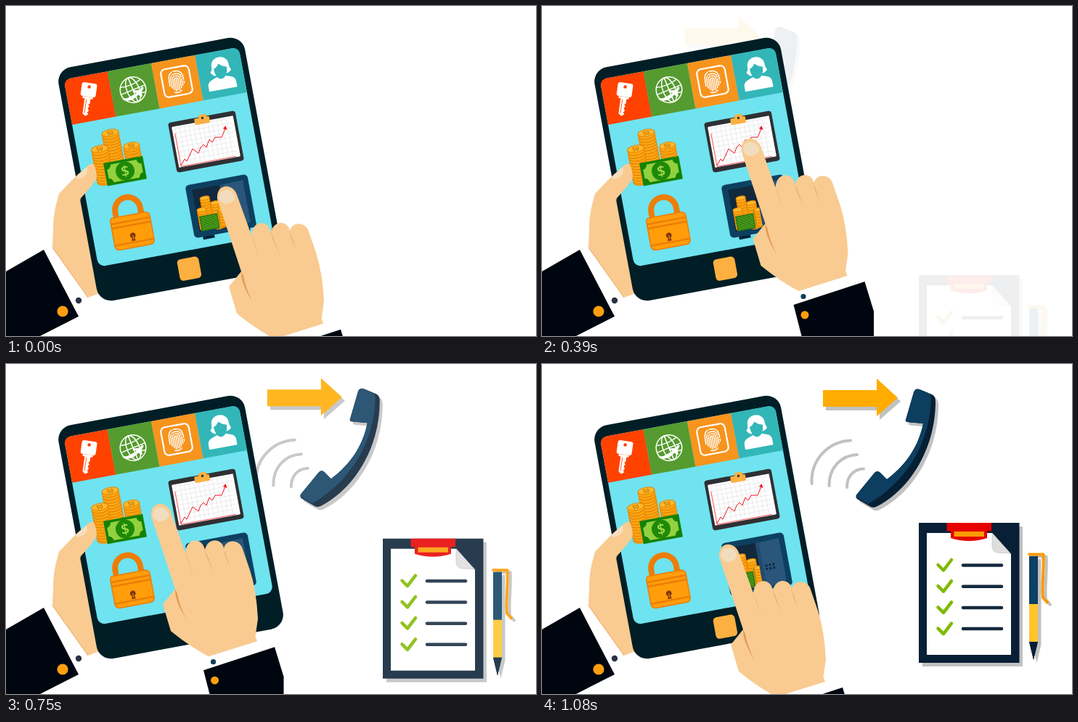
Animation of 730 by 455 pixels, one loop 1.85 s. Source, as an HTML page:

```html
<!DOCTYPE html>
<html lang="en">
<head>
<meta charset="utf-8">
<title>Mobile banking</title>
<style>
  html, body { margin: 0; width: 100%; height: 100%; overflow: hidden; background: #fff; }
  svg { display: block; width: 730px; height: 455px; }
  text { font-family: "Open Sans", Arial, sans-serif; text-anchor: middle; }
</style>
</head>
<body>
<svg viewBox="0 0 730 455">
  <defs>
    <path id="arrow" d="M387 36H461V20L490 46.500L461 72V59H387Z"/>
    <path id="handset" d="M501 77L512 39Q514 33 520 35L537 42Q542 44 542 52C542 115 508 173 460 197Q455 199 451 196L434 186Q431 183 434 180L458 150Q462 146 466 150L475 159C503 138 519 112 525 82L503 80Q500 79 501 77Z"/>
    <path id="pen" d="M671 265H683V383L677 408L671 383Z"/>
    <path id="penClip" d="M669.500 262.500H690.500C692 282 688 305 690 322L697 330" fill="none" stroke-width="4" stroke-linejoin="round"/>
    <path id="tick" d="M545.500 277L553 284.500L564 270" fill="none" stroke="#7fba00" stroke-width="4.500" stroke-linecap="round" stroke-linejoin="round"/>
    <path id="line" d="M580 277.500H633" stroke="#14293e" stroke-width="4.500" stroke-linecap="round"/>
    <pattern id="grid" width="6.500" height="6.500" patternUnits="userSpaceOnUse">
      <path d="M0 .5H6.500M.5 0V6.500" stroke="#e2e2e6" stroke-width=".7"/>
    </pattern>
    <pattern id="hatch" width="3" height="3" patternUnits="userSpaceOnUse" patternTransform="rotate(35)">
      <rect width="3" height="3" fill="#1c7d0d"/><path d="M0 1H3" stroke="#86b32a"/>
    </pattern>
  </defs>

  <g id="phone">
    <use href="#arrow" x="4" y="5" fill="#c1c1c1"/>
    <use href="#arrow" fill="#ffab00"/>
    <g fill="none" stroke="#c1c1c1" stroke-width="4" stroke-linecap="round">
      <path d="M371.500 165C370 132 394 107 425 105.500"/>
      <path d="M395.500 168C395 144 411 126 434 125"/>
      <path d="M420 170C420 154 430 145 443 144.500"/>
    </g>
    <use href="#handset" x="4" y="4.500" fill="#c1c1c1"/>
    <use href="#handset" fill="#071f33"/>
    <path fill="#0d3e60" d="M501 77L512 39Q514 33 520 35L532 40Q536 42 536 49C534 108 503 162 449 193L434 184Q431 182 434 179L458 150Q462 146 466 150L475 159C503 138 519 112 525 82L503 80Q500 79 501 77Z"/>
  </g>

  <g id="checklist">
    <path fill="#c1c1c1" d="M524 224H662V417H524Z"/>
    <path fill="#091f35" d="M519 219H657.500V412H519Z"/>
    <path fill="#fff" d="M530 233H620L646 262V401H530Z"/>
    <path fill="#dedede" stroke="#bbb" stroke-width=".6" d="M620 233L646 262C638 259 630 262 624 259Q620 257 620 250Z"/>
    <path fill="#e60000" d="M557.500 219H619V230.500H613V240Q588 248 563 240V230.500H557.500Z"/>
    <path fill="#fb9a00" d="M567.500 231H609V238H567.500Z"/>
    <g id="rows"></g>
    <use href="#pen" x="4.500" y="4" fill="#c1c1c1"/>
    <use href="#penClip" x="4" y="3" stroke="#c1c1c1"/>
    <use href="#pen" fill="#0d4063"/>
    <path fill="#ffc52e" d="M671 331H683V383H671Z"/>
    <path fill="#091f35" d="M671 383H683L677 408Z"/>
    <use href="#penClip" stroke="#fb9a00"/>
  </g>

  <path fill="#f9cb91" d="M100 231L73 259Q65 285 65 305L64 333L113 402L126 397H140V240Z"/>
  <path fill="none" stroke="#eda45a" d="M64 333L113 402"/>

  <g transform="translate(227 225) rotate(-10.5)">
    <rect x="-130.500" y="-163.500" width="261" height="327" rx="20" fill="#011e26"/>
    <rect x="-122.500" y="-148.500" width="245" height="263" rx="10" fill="#6fe3ef"/>
    <path fill="#ff4200" d="M-122.500 -85V-138.500Q-122.500 -148.500 -112.500 -148.500H-61.250V-85Z"/>
    <path fill="#559b2f" d="M-61.250 -148.500H0V-85H-61.250Z"/>
    <path fill="#f7941d" d="M0 -148.500H61.250V-85H0Z"/>
    <path fill="#33b6b8" d="M61.250 -148.500H112.500Q122.500 -148.500 122.500 -138.500V-85H61.250Z"/>
    <rect x="-15" y="124.500" width="30" height="30" rx="5" fill="#fbb040"/>
  </g>

  <g transform="translate(114 116) rotate(8)" fill="#fff">
    <rect x="-10.500" y="-10" width="21" height="19" rx="3"/>
    <path d="M-7 9H7V12H4V18L2 20L4 22L2 25L4 28L2 31L4 33L0 36L-4 33V12H-7Z"/>
    <circle cx="0" cy="-4.500" r="2.300" fill="#ff4200"/>
    <path d="M-1.500 13V32" stroke="#ff4200" stroke-width=".8"/>
  </g>

  <g transform="translate(175 115.500) rotate(-10.500)" fill="none" stroke="#fff" stroke-width="1.500">
    <circle r="17.800"/>
    <g transform="rotate(-12)">
      <ellipse rx="8.500" ry="17.800"/>
      <path d="M0 -18V18M-18 0H18M-15 -9.500Q0 -5 15 -9.500M-15 9.500Q0 5 15 9.500"/>
    </g>
    <path fill="#fff" stroke="none" d="M-17 9Q-3 12 4 5L-1 3L1 1L8 2L13 -2L15 0L11 5L11 11L9 12L6 8Q-4 17 -15 12Z"/>
  </g>

  <g transform="translate(235 104) rotate(-10.500)" fill="none" stroke="#fff">
    <rect x="-19.500" y="-19.500" width="39" height="39" rx="6" stroke-width="2.200"/>
    <g stroke-width="1.500" stroke-linecap="round">
      <path d="M0 -3V12M-2.500 13V-2Q-2.500 -5 0 -5T2.500 -2V12M-5 11V-3Q-5 -8 0 -8T5 -3V10"/>
      <path d="M-7.500 8V-3Q-7.500 -11 0 -11T7.500 -3V7" stroke-dasharray="16 2"/>
      <path d="M-10 5V-3Q-10 -14.500 0 -14.500T10 -3V4" stroke-dasharray="21 2.500"/>
      <path d="M-5 14.500Q0 17 5 13"/>
    </g>
  </g>

  <g transform="translate(296 94) rotate(-10.500)" fill="#fff">
    <path d="M-9 1Q-12 -1 -14 -5Q-11 -7 -11 -11C-12 -28 14 -28 13 -11Q13 -7 15 -4Q12 0 8 0Z"/>
    <path d="M-20 21V14Q-20 8 -14 6L-6 3Q0 10 6 3L14 6Q19 8 19 14V21Z"/>
    <path fill="#33b6b8" d="M-8.500 -9Q-4 -10 -1 -15Q4 -10 9.500 -9Q10 -2 5 4Q0 8 -5 4Q-9 -2 -8.500 -9Z"/>
  </g>

  <g id="coins"></g>

  <g transform="translate(164 227.500) rotate(-10.500)">
    <rect x="-27.500" y="-16" width="55" height="32" fill="#158205"/>
    <path fill="#92d13f" d="M-18 -12.500H18Q19 -7 24 -6V6Q19 7 18 12.500H-18Q-19 7 -24 6V-6Q-19 -7 -18 -12.500Z"/>
    <circle r="13" fill="#1f8a08"/>
    <text y="7" font-size="20" font-weight="600" fill="#a3db4d">$</text>
  </g>

  <g transform="translate(275.500 187) rotate(-10.500)">
    <rect x="-47" y="-35" width="94" height="70" rx="4" fill="#2f3034"/>
    <rect x="-43" y="-28.500" width="86" height="57" rx="1.500" fill="#fff"/>
    <rect x="-39" y="-26" width="78" height="52" fill="url(#grid)"/>
    <path d="M-40 -19V27.500H37" fill="none" stroke="#f33" stroke-width=".8"/>
    <rect x="-10.500" y="-34" width="21" height="9" rx="1.500" fill="#fbb040"/>
    <rect x="-4" y="-38" width="11" height="8" rx="2" fill="#fbb040"/>
    <circle cx="1" cy="-33" r="1.700" fill="#2f3034"/>
  </g>
  <path fill="none" stroke="#f0141e" d="M241 220L246 211L249 214L257 197L265 203L268 195L272 191L276 195L280 184L284 188L288 181L297 181L302 169"/>
  <path fill="#f0141e" d="M302.500 165L304.500 171L299 169Z"/>

  <g transform="translate(173.500 310) rotate(-10.500)">
    <path d="M-18 -20V-29.500A17.500 17.500 0 0 1 17 -29.500V-20" fill="none" stroke="#ed7d05" stroke-width="8"/>
    <path fill="#ff9d0a" stroke="#ed7d05" stroke-width="1.500" d="M-23 -22H22Q28 -22 28 -15V16Q28 23 21 23H-20Q-27 23 -27 16V-15Q-27 -22 -23 -22Z"/>
    <path d="M-27 -14H28M-27 -8H28M-27 16H28" stroke="#ed7d05" stroke-width="2.500"/>
    <path fill="#7b3308" stroke="#ed7d05" stroke-width=".5" d="M-1.800 10A4 4 0 1 1 1.800 10L3 14H-3Z"/>
    <path d="M0 6V12" stroke="#ed9a30" stroke-width="1"/>
  </g>

  <g transform="translate(296 276) rotate(-10.500)">
    <path d="M-32 36H-16V41H-32ZM20 36H34V40H20Z" fill="#062238"/>
    <rect x="-43.500" y="-37" width="87" height="74" rx="5" fill="#0d4060"/>
    <rect x="-35" y="-29" width="70" height="58" fill="#12283d"/>
    <g id="savings"></g>
    <rect x="-31.500" y="9" width="24" height="20" fill="url(#hatch)" stroke="#14690a"/>
    <path fill="#2b567b" d="M3 -29L36 -30V29L3 35Z"/>
    <path fill="#234a6d" d="M3 -29L8 -29V34L3 35Z"/>
    <path d="M11 4H24M11 9H24" stroke="#0d2b45" stroke-width="3" stroke-dasharray="3 2"/>
  </g>

  <path fill="#f9cb91" d="M73 259L97 234L113 220Q119 215 122 220Q125 228 125 236Q124 242 103 265L100 276Z"/>
  <path fill="#f7dfbd" d="M95 237L111 222Q114 230 107 236Q101 240 95 237Z"/>
  <path fill="#00060f" d="M0 366L52 336L100 428L47 455H0Z"/>
  <circle cx="100" cy="406" r="4.200" fill="#2b3146"/>
  <circle cx="78" cy="421" r="7.600" fill="#ff9f0f"/>

  <g id="hand">
    <path fill="#fff" d="M370 457L437 436L443 452L365 478Z"/>
    <path fill="#f9cb91" d="M291 266C289 244 314 243 319 263L338 316C340 294 362 295 365 312C369 294 389 296 391 310C394 297 413 297 417 311L427 340Q436 368 438 407L434.500 431L437 438L370 459Q345 446 318 424L307 387L324 366Z"/>
    <g fill="#e29d5a">
      <path d="M338 315L350.500 351L341 325Z"/>
      <path d="M364.500 311L378 345L367 320Z"/>
      <path d="M390.500 310L400.500 339L393 320Z"/>
      <path d="M324 366Q323 382 339 407Q329 386 327 372Z"/>
    </g>
    <path fill="#f1dcbe" d="M293 264Q294 253 304 253.500Q313 254 316 264Q314 271 304 273Q296 273 293 264Z"/>
    <path fill="#00060f" d="M363 478L461 446L473.500 487V560H384Z"/>
    <circle cx="376.500" cy="466.500" r="3.600" fill="#0d3e5a"/>
    <circle cx="378.500" cy="492" r="5.500" fill="#ff9f0f"/>
  </g>
</svg>
<script>
const LOOP = 1850, STEP = 30, LAST = 36, TILT = -10.5;
const HAND_KEYS = [[0, 0, 0], [11, 0, -66], [23, -99, -66], [LAST, -47, 0]];
const el = id => document.getElementById(id);

function coinStack(x, y, rx, height, label, tilt = TILT) {
  const ry = rx * 0.42;
  const rim = d => `M${-rx} ${d}A${rx} ${ry} 0 0 0 ${rx} ${d}`;
  let rims = "";
  for (let d = 4; d < height; d += 4) rims += rim(d);
  const text = label ? `<text y="3" font-size="8" font-weight="700" fill="#c97a00">50</text>` : "";
  return `<g transform="translate(${x} ${y}) rotate(${tilt})">
    <path fill="#fba614" stroke="#e58300" stroke-width=".7" d="M${-rx} 0${rim(height).replace("M", "L")}V0Z"/>
    <path fill="none" stroke="#e58300" stroke-width="1.200" d="${rims}"/>
    <ellipse rx="${rx}" ry="${ry}" fill="#ffb92c" stroke="#e58300"/>${text}</g>`;
}

el("coins").innerHTML = coinStack(143.5, 175, 11.5, 52, true)
  + coinStack(172.5, 192.5, 11, 30, true) + coinStack(129, 197, 11.5, 46, true);
el("savings").innerHTML = coinStack(-20, -15, 6.5, 40, false, 0)
  + coinStack(-7, -6, 6.5, 34, false, 0) + coinStack(-27, 0, 6.5, 26, false, 0)
  + `<rect x="-6" y="4" width="10" height="20" fill="url(#hatch)"/>`
  + coinStack(1, 5, 6, 22, false, 0);
el("rows").innerHTML = [0, 1, 2, 3].map(i =>
  `<use href="#tick" y="${i * 29.2}"/><use href="#line" y="${i * 29.2}"/>`).join("");

function handOffset(frame) {
  const i = HAND_KEYS.findIndex(key => key[0] >= frame) || 1;
  const [f0, x0, y0] = HAND_KEYS[i - 1], [f1, x1, y1] = HAND_KEYS[i];
  const k = (frame - f0) / (f1 - f0);
  return [x0 + (x1 - x0) * k, y0 + (y1 - y0) * k];
}

function place(id, x, y, opacity = 1) {
  el(id).setAttribute("transform", `translate(${x} ${y})`);
  el(id).setAttribute("opacity", opacity);
}

function render(time) {
  const frame = Math.min(LAST, Math.floor(time % LOOP / STEP));
  const shown = Math.min(1, Math.max(0, (frame - 12) / 15));
  const left = 1 - shown;
  place("hand", ...handOffset(frame));
  place("phone", -204 * left, -6.4 * left, shown);
  place("checklist", 0, 163 * left, shown);
}

const start = performance.now();
function tick(now) {
  render(Math.max(0, now - start));
  requestAnimationFrame(tick);
}
render(0);
requestAnimationFrame(tick);
</script>
</body>
</html>
```
